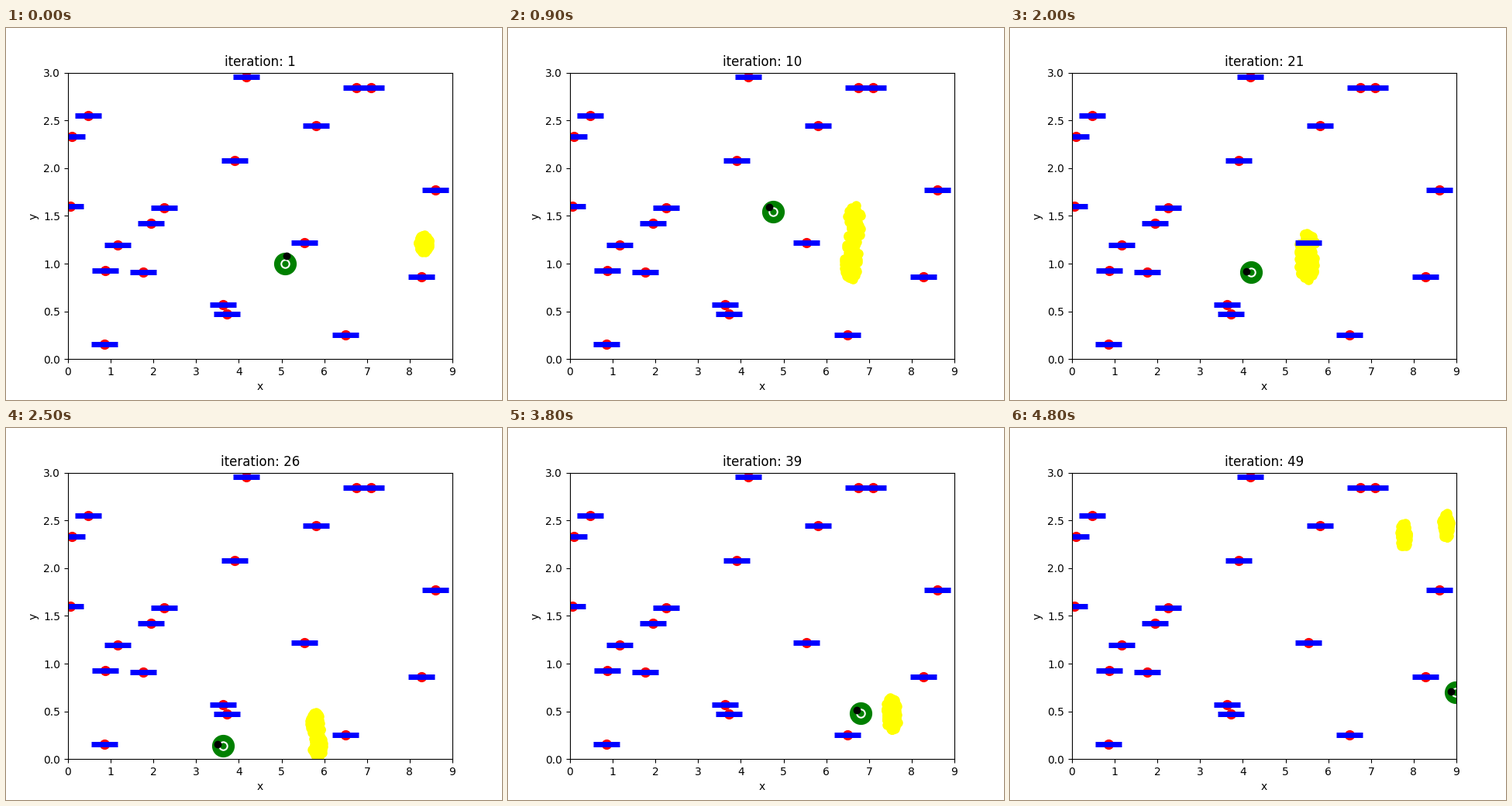
A matplotlib script for the animation above (4900 ms loop, 640x480 px).

```python
import numpy as np
import matplotlib.pyplot as plt
from matplotlib.animation import FuncAnimation

STEPS, INTERVAL = 49, 100
WIDTH, HEIGHT = 9, 3
LOBE_SIZE = 60

LANDMARKS = [
    (4.168, 2.96), (6.758, 2.84), (7.088, 2.84), (0.468, 2.55), (0.088, 2.33),
    (5.808, 2.446), (3.908, 2.08), (8.598, 1.77), (0.048, 1.60), (2.248, 1.586),
    (1.938, 1.42), (5.528, 1.22), (1.158, 1.196), (0.868, 0.925), (1.758, 0.91),
    (8.278, 0.86), (3.638, 0.57), (3.718, 0.47), (6.488, 0.25), (0.848, 0.155),
]

# Robot: step, x, y, heading. The y axis wraps, so y keeps growing here.
ROUTE = [
    (0, 5.08, 1.0, 1.2), (5, 4.90, 2.74, 2.8), (6, 4.95, 2.97, 2.7),
    (14, 4.43, 7.16, 2.15), (20, 4.20, 9.91, 3.06), (23, 3.13, 11.25, 3.0),
    (25, 3.62, 12.14, 2.95), (30, 4.72, 13.8, 2.88), (38, 6.81, 15.48, 2.72),
    (48, 8.98, 18.70, 3.1),
]

# Cloud: robot y, then two lobe centres and the radii both lobes share.
CLOUD = [
    (1.00, 8.33, 1.21, 8.33, 1.21, .13, .09),
    (2.74, 7.05, 2.50, 7.15, 2.02, .15, .26),
    (7.16, 6.05, 7.20, 5.76, 7.00, .20, .20),
    (9.91, 5.50, 10.15, 5.50, 10.0, .20, .18),
    (13.8, 6.10, 13.62, 6.01, 14.12, .09, .09),
    (15.48, 7.52, 15.53, 7.54, 15.42, .14, .13),
    (18.70, 7.77, 17.34, 8.76, 17.45, .10, .14),
]


def track(at, table):
    """Interpolate every column of a table over its first one."""
    keys, *columns = np.transpose(table)
    return [np.interp(at, keys, column) for column in columns]


def particles_at(step, progress):
    """Scatter the cloud evenly over its two elliptic lobes."""
    ax_, ay, bx, by, rx, ry = track(progress, CLOUD)
    rng = np.random.default_rng(step)
    turn = rng.uniform(0, 2 * np.pi, (2, LOBE_SIZE))
    r = np.sqrt(rng.random((2, LOBE_SIZE)))
    x = np.array([[ax_], [bx]]) + rx * r * np.cos(turn)
    y = np.array([[ay], [by]]) + ry * r * np.sin(turn)
    return x.ravel(), y.ravel() % HEIGHT


fig, ax = plt.subplots(figsize=(6.4, 4.8), dpi=100)
ax.set(xlim=(0, WIDTH), ylim=(0, HEIGHT), xlabel="x", ylabel="y")
title = ax.set_title("")


def dots(color, size, z, marker="o", **style):
    return ax.plot([], [], marker, color=color, ms=size, zorder=z, **style)[0]


marks = np.transpose(LANDMARKS)
dots("red", 8.5, 1.0).set_data(*marks)
cloud = dots("yellow", 8, 1.1)
dots("blue", 25, 1.9, "_", mew=5).set_data(*marks)
body = dots("green", 20, 2.0)
ring = dots("white", 7.5, 2.1, mfc="none", mew=1.5)
nose = dots("black", 6, 2.2)


def update(step):
    x, progress, angle = track(step, ROUTE)
    y = progress % HEIGHT
    body.set_data([x], [y])
    ring.set_data([x], [y])
    nose.set_data([x + 0.115 * np.cos(angle)], [y + 0.09 * np.sin(angle)])
    cloud.set_data(*particles_at(step, progress))
    title.set_text(f"iteration: {step + 1}")
    return body, ring, nose, cloud, title


anim = FuncAnimation(fig, update, frames=STEPS, interval=INTERVAL,
                     repeat=True, repeat_delay=0, blit=False)
plt.show()
```
